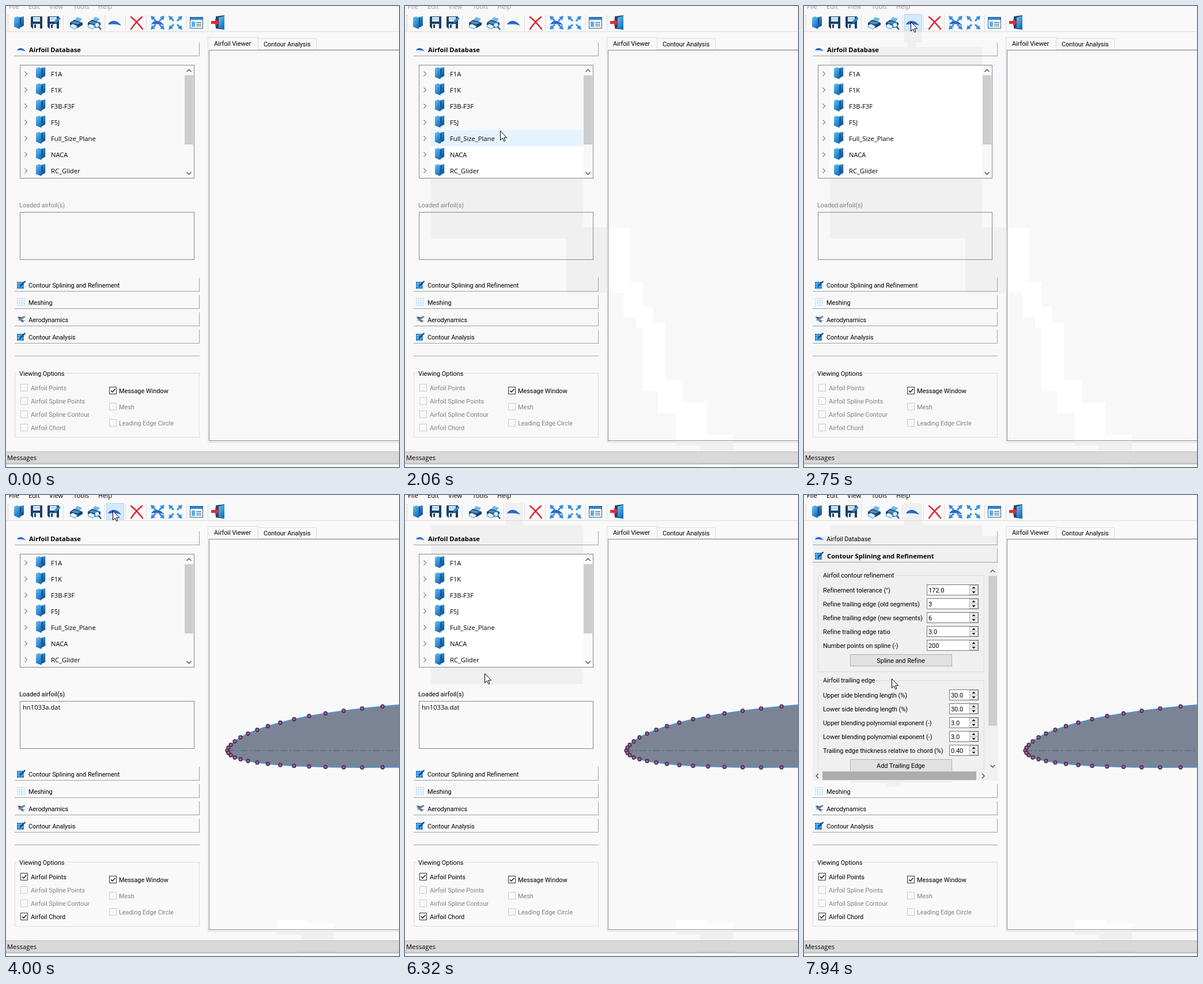
An HTML page for the animation above (8 s loop, 682 by 799 pixels).

```html
<!DOCTYPE html>
<html lang="en">
<head>
<meta charset="utf-8">
<title>Airfoil workbench</title>
<style>
html, body { margin: 0; width: 100%; height: 100%; overflow: hidden; background: #f8f8f8; }
svg { display: block; width: 682px; height: 799px; }
text { font: 11px Roboto, "Liberation Sans", sans-serif; letter-spacing: -.08px; fill: #000; white-space: pre; }
.ui { font: 11.2px "Open Sans", "Noto Sans", sans-serif; letter-spacing: 0; }
.bold { font: bold 11.2px "Open Sans", "Noto Sans", sans-serif; letter-spacing: 0; }
.mid { text-anchor: middle; }
.dim { fill: #838383; }
.faint { fill: #999; }
.line { fill: none; stroke: #a0a0a0; shape-rendering: crispEdges; }
.soft { stroke: #dcdcdc; }
.frame { stroke: #828790; }
.dots { stroke: #b4b4b4; stroke-dasharray: 2 2; }
.box { shape-rendering: crispEdges; }
.chev { fill: none; stroke: #505050; stroke-width: 1.4; }
.tick { fill: none; stroke: #111; stroke-width: 1.3; }
.hide { display: none; }
</style>
</head>
<body>
<svg id="stage" viewBox="0 0 682 799" xmlns="http://www.w3.org/2000/svg"></svg>
<script>
const LOOP = 8000, MENU_ON = 3830, LOADED = 4000, PAGE = 7400;

// ---------- drawing helpers ----------
const text = (x, y, s, cls = '') => `<text x="${x}" y="${y}" class="${cls}">${s}</text>`;
const rect = (x, y, w, h, fill, stroke) => stroke
  ? `<rect class="box" x="${x + .5}" y="${y + .5}" width="${w - 1}" height="${h - 1}" fill="${fill}" stroke="${stroke}"/>`
  : `<rect class="box" x="${x}" y="${y}" width="${w}" height="${h}" fill="${fill}"/>`;
const path = (d, fill, more = '') => `<path d="${d}" fill="${fill}" ${more}/>`;
const line = (d, cls = '') => `<path d="${d}" class="line ${cls}"/>`;
const use = (id, x, y, s = 1) => `<use href="#${id}" transform="translate(${x} ${y}) scale(${s})"/>`;
const group = (cls, s) => `<g class="${cls}">${s}</g>`;
const chevron = (x, y, turn) =>
  `<path class="chev" d="M-4 2L0-2 4 2" transform="translate(${x} ${y}) rotate(${turn})"/>`;

const defs = `<defs>
<linearGradient id="sky" x2="0.6" y2="1"><stop stop-color="#69c3f2"/><stop offset="1" stop-color="#1670bd"/></linearGradient>
<linearGradient id="sea" x2="0.3" y2="1"><stop stop-color="#3b9be0"/><stop offset="1" stop-color="#134f94"/></linearGradient>
<clipPath id="view"><rect x="353" y="77" width="329" height="676"/></clipPath>
<clipPath id="scroll"><rect x="15" y="118" width="304" height="360"/></clipPath>
<pattern id="fresh" width="682" height="799" patternUnits="userSpaceOnUse">
  <rect width="682" height="799" fill="#f0f0f0"/>
  <path d="M351 76H682V756H351ZM25 103H326V298H25ZM0 794H682V799H0Z" fill="#fff"/>
  <path class="loaded" d="M25 358H326V439H25Z" fill="#fff"/>
</pattern>
<g id="folder">${path('M7 3L18 1V17L9 22Z', 'url(#sea)') + path('M1 3L7 1 11 5V23L1 19Z', 'url(#sky)') + path('M11 5L13 3V13L11 16Z', '#0f4a86')}</g>
<g id="disk">${path('M1 0H20V21H3L0 18V1Z', '#1c3f66') + rect(4, 1, 12, 8, '#d9ecfa') + rect(5, 4, 10, 1, '#7fb1dc') + rect(4, 13, 12, 8, '#eef5fb') + rect(6, 14, 3, 6, '#1c3f66')}</g>
<g id="pen">${path('M0 13L2 8 11 0 14 3 5 11Z', '#2f86cf') + path('M0 13L2 8 5 11Z', '#173a60')}</g>
<g id="printer">${path('M8 8L13 1 22 4 17 11Z', '#6bb8ee') + path('M1 11L8 6 23 11V15L14 20 1 15Z', '#1f4166') + path('M3 11L8 8 20 11 14 14Z', '#4a90cc') + path('M2 15L6 13 14 17 10 22 1 18Z', '#e6f3fc', 'stroke="#3d93d6"')}</g>
<g id="wing">${path('M0 7C4-1 15-2 23 9C16 6 8 6 0 7Z', '#2a66cf')}</g>
<g id="arrow">${path('M0 0L8 2 6 4 10 8 8 10 4 6 2 8Z', '#2e8fe0')}</g>
<g id="arrows">${[0, 90, 180, 270].map(a => `<use href="#arrow" transform="rotate(${a} 12 12)"/>`).join('')}</g>
<g id="mesh">${rect(0, 0, 15, 15, '#eff8fe') + path('M.5 0V15M4.5 0V15M8.5 0V15M12.5 0V15M0 .5H15M0 4.5H15M0 8.5H15M0 12.5H15', 'none', 'stroke="#b7dcf3" stroke-dasharray="2 1"')}</g>
<g id="spline">${rect(0, 2, 12, 12, '#2484d0') + path('M3.5 2V14M7.5 2V14M0 5.5H12M0 9.5H12', 'none', 'stroke="#7cc0ee"') + path('M4 12L6 7 14 0 15 2 8 9Z', '#1b4a7c')}</g>
<g id="plane">${path('M0 4L4 5 13 1 15 3 9 7 12 13 9 12 5 9 1 9 4 7Z', '#76879a') + path('M1 2L9 4 4 6ZM7 9L15 9 9 11Z', '#35506e')}</g>
</defs>`;

// ---------- toolbar and right side ----------
const menu = cls => [['File', 5], ['Edit', 39], ['View', 75], ['Tools', 117], ['Help', 160]]
  .map(([s, x]) => text(x, 5, s, 'ui ' + cls)).join('');

const toolbar = line('M3.5 16V43', 'dots') + line('M0 44.5H682', 'soft')
  + [99, 171, 207, 243, 313, 350].map(x => line(`M${x}.5 16V42`, 'soft')).join('')
  + use('folder', 13, 17) + use('disk', 43, 18) + use('disk', 72, 18) + use('pen', 81, 19)
  + use('printer', 110, 18) + use('printer', 141, 18)
  + '<circle cx="158" cy="33" r="4.2" fill="#d5edfb" stroke="#2f79b8" stroke-width="1.5"/>' + path('M161 36L165 41', 'none', 'stroke="#1f4e7c" stroke-width="2.2"')
  + use('wing', 177, 25)
  + path('M217 19Q227 27 237 40M236 19Q225 28 217 40', 'none', 'stroke="#e0222c" stroke-width="2.4" stroke-linecap="round"')
  + use('arrows', 251, 17) + use('wing', 252, 25, .98) + use('arrows', 282, 17)
  + rect(319, 19, 23, 20, '#f4fafe', '#2b5f92') + rect(320, 20, 21, 4, '#2f86cf') + rect(322, 27, 6, 9, '#58aee6')
  + path('M330 28.5H339M330 31.5H339M330 34.5H339', 'none', 'stroke="#33475c"')
  + path('M364 18L379 16V41L364 39Z', '#24486c') + path('M369 20L379 17V41L369 38Z', 'url(#sky)')
  + path('M356 26H363V22L370 28.5 363 35V31H356Z', '#d92b3a');

const tabs = line('M350.5 756V54.5H437.5V75M437.5 56.5H538.5V75.5M437 75.5H682M350 756.5H682', 'soft')
  + line('M683 76.5H352.5V753.5H683', 'frame')
  + text(361, 69, 'Airfoil Viewer') + text(447, 70, 'Contour Analysis');

const messages = rect(-1, 772, 684, 20, '#d9d9d9', '#bdbdbd') + line('M0 793.5H682', 'frame') + text(2, 787, 'Messages', 'ui');

function airfoil() {
  const xs = [384, 386, 390, 397, 407, 420, 436, 454.5, 476, 500, 526, 554.5, 586, 618, 653.5, 692];
  const up = [443, 438, 433, 427, 420, 413.5, 407, 400.5, 394.5, 388.5, 383, 378.5, 374, 370, 366.3, 363];
  const low = [443, 447, 451, 455, 458, 461, 463.7, 466, 468, 469.4, 470.5, 471.3, 472, 472.2, 472, 471.7];
  const top = xs.map((x, i) => [x, up[i]]), bottom = xs.map((x, i) => [x, low[i]]);
  const all = [...top.reverse(), ...bottom.slice(1)];
  return `<g clip-path="url(#view)">${path('M' + all.join('L'), '#7b8494', 'stroke="#4595e2" stroke-width="1.7"')}
    ${path('M384 443H682', 'none', 'stroke="#555c69" stroke-dasharray="12 4 3 4"')}
    ${all.map(([x, y]) => `<circle cx="${x}" cy="${y}" r="3" fill="#a8588f" stroke="#3d2946" stroke-width="1.3"/>`).join('')}</g>`;
}

// ---------- left side ----------
const drawer = (y, icon, s, cls = '') => line(`M15 ${y + 23.5}H335.5V${y}`)
  + (icon === 'wing' ? use('wing', 19, y + 9.5, .65) : use(icon, 19, y + 5))
  + text(cls ? 40 : 39, y + 17, s, cls);

const folders = ['F1A', 'F1K', 'F3B-F3F', 'F5J', 'Full_Size_Plane', 'NACA', 'RC_Glider'];
const database = drawer(63, 'wing', 'Airfoil Database', 'bold')
  + line('M24.5 102.5H326.5V298.5H24.5Z', 'frame')
  + folders.map((s, i) => `<path class="chev" style="stroke:#8a8a8a" d="M32.5 ${113.5 + 28 * i}l4 4-4 4"/>`
    + use('folder', 51, 105 + 28 * i, .96) + text(78, 122 + 28 * i, s, 'ui')).join('')
  + rect(310, 120, 15, 120, '#cdcdcd') + chevron(317.5, 112, 0) + chevron(317.5, 290, 180)
  + group('empty', text(23, 349, 'Loaded airfoil(s)', 'dim'))
  + group('loaded', text(23, 349, 'Loaded airfoil(s)') + text(29, 372, 'hn1033a.dat', 'ui'))
  + line('M24.5 357.5H326.5V439.5H24.5Z', 'frame')
  + drawer(471, 'spline', 'Contour Splining and Refinement');

function spin(x, cy, value) {
  const y = cy - 10, b = 287;
  return rect(x, y, 303 - x, 19, '#fff', '#7a7a7a')
    + rect(b, y + 1, 15, 9, '#f0f0f0', '#b5b5b5') + rect(b, y + 9, 15, 9, '#f0f0f0', '#b5b5b5')
    + path(`M${b + 4.5} ${y + 7}h6l-3-3.5ZM${b + 4.5} ${y + 12}h6l-3 3.5Z`, '#111')
    + text(x + 3, cy + 4, value);
}
const field = (x, y) => ([label, value], i) => text(33, y + 4 + 24 * i, label) + spin(x, y + 24 * i, value);
const button = (y, s, fill = '#e1e1e1', edge = '#adadad') => rect(80, y, 177, 21, fill, edge) + text(168, y + 15, s, 'mid');

const refine = rect(15, 71, 321, 424, '#f0f0f0')
  + drawer(63, 'wing', 'Airfoil Database')
  + drawer(93, 'spline', 'Contour Splining and Refinement', 'bold')
  + `<g clip-path="url(#scroll)">`
  + line('M30 139.5H24.5V306.5H312.5V139.5H158', 'soft') + text(33, 143, 'Airfoil contour refinement')
  + [['Refinement tolerance (°)', '172.0'], ['Refine trailing edge (old segments)', '3'],
     ['Refine trailing edge (new segments)', '6'], ['Refine trailing edge ratio', '3.0'],
     ['Number points on spline (-)', '200']].map(field(213, 165)).join('')
  + button(276, 'Spline and Refine')
  + line('M30 321.5H24.5V500H312.5V321.5H125', 'soft') + text(33, 325, 'Airfoil trailing edge')
  + [['Upper side blending length (%)', '30.0'], ['Lower side blending length (%)', '30.0'],
     ['Upper blending polynomial exponent (-)', '3.0'], ['Lower blending polynomial exponent (-)', '3.0'],
     ['Trailing edge thickness relative to chord (%)', '0.40']].map(field(252, 347)).join('')
  + button(458, 'Add Trailing Edge') + group('hot', button(458, 'Add Trailing Edge', '#e5f1fb', '#0078d7')) + '</g>'
  + rect(320, 140, 15, 260, '#cdcdcd') + chevron(327.5, 132, 0) + chevron(327.5, 470, 180)
  + rect(32, 479, 267, 15, '#adadad') + chevron(23, 487, 270) + chevron(311, 487, 90);

function check(x, cy, s, on) {
  return rect(x, cy - 7, 13, 13, on ? '#fff' : 'none', on ? '#333' : '#ccc')
    + (on ? `<path class="tick" d="M${x + 3} ${cy - .5}l2.5 2.8 5-5.6"/>` : '')
    + text(x + (x < 100 ? 18 : 17), cy + 4, s, on ? '' : 'dim');
}
const options = line('M15 606.5H336')
  + line('M20 636.5H15.5V747.5H335.5V636.5H103', 'soft') + text(23, 641, 'Viewing Options')
  + group('empty', check(25, 662, 'Airfoil Points') + check(25, 731, 'Airfoil Chord'))
  + group('loaded', check(25, 662, 'Airfoil Points', 1) + check(25, 731, 'Airfoil Chord', 1))
  + check(25, 685, 'Airfoil Spline Points') + check(25, 708, 'Airfoil Spline Contour')
  + check(179, 667, 'Message Window', 1) + check(179, 695, 'Mesh') + check(179, 723, 'Leading Edge Circle');

const stage = document.getElementById('stage');
stage.innerHTML = defs + '<rect id="base" width="682" height="799"/><path id="trail" fill="url(#fresh)"/>'
  + '<rect id="glow" class="box"/>'
  + group('idle', menu('faint')) + group('ready', menu('')) + toolbar + tabs + group('loaded', airfoil())
  + group('first', database) + group('second', refine)
  + drawer(501, 'mesh', 'Meshing') + drawer(531, 'plane', 'Aerodynamics') + drawer(561, 'spline', 'Contour Analysis')
  + options + messages
  + '<path id="cursor" d="M.5.5V16.5L4.3 13 6.8 18.6 9 17.6 6.6 12.2H11.6Z" fill="#fff" stroke="#000"/>';

// ---------- motion: time, pointer x, pointer y, hovered part ----------
const TOOL = 'tool', ADD = 'add';
const moves = [
  [1210, 557, 780], [1290, 512, 743], [1360, 470, 687], [1440, 439, 648], [1520, 412, 549], [1590, 419, 539],
  [1820, 401, 521], [1900, 379, 478], [1980, 280, 384], [2060, 165, 216, 4], [2130, 161, 175, 2], [2210, 163, 150, 1],
  [2290, 168, 130, 0], [2360, 174, 106, 0], [2440, 180, 71], [2520, 182, 53], [2590, 182, 44],
  [2670, 184, 33, TOOL], [2750, 185, 27, TOOL],
  [5940, 181, 37, TOOL], [6020, 176, 52], [6090, 166, 110, 0], [6170, 154, 177, 2], [6250, 144, 245, 5], [6320, 138, 309],
  [6400, 138, 365], [6480, 140, 417], [6560, 144, 460], [6630, 148, 486], [6710, 155, 484], [6790, 156, 483],
  [7780, 156, 480], [7860, 154, 459, ADD], [7940, 152, 318]
];

// Boxes are [left, top, right, bottom].
const part = h => h === TOOL ? [174, 14, 205, 43] : h === ADD ? [80, 458, 257, 479]
  : h >= 0 ? [45, 103 + 28 * h, 309, Math.min(298, 131 + 28 * h)] : null;
const union = list => [0, 1, 2, 3].map(i => Math[i < 2 ? 'min' : 'max'](...list.map(b => b[i])));
const pointer = m => [m[1], m[2], m[1] + 12, m[2] + 19];

// Each move repaints one box around the old and new pointer and any changed hover.
const repaints = moves.map((m, i) => {
  const last = moves[i - 1], list = [pointer(m)];
  if (last) list.push(pointer(last));
  if (last && last[3] !== m[3]) list.push(...[part(last[3]), part(m[3])].filter(Boolean));
  return { at: m[0], box: union(list) };
});
repaints.push({ at: 7170, box: [15, 471, 336, 495] });

function trail(t) {
  let d = '';
  for (const { at, box: [l, top, r, b] } of repaints) {
    if (at > t) continue;
    const y = t >= LOADED && at < LOADED ? Math.max(top, 737) : top;
    if (y < b) d += `M${l} ${y}H${r}V${b}H${l}Z`;
  }
  return d;
}

const $ = id => document.getElementById(id);
const show = (cls, on) => stage.querySelectorAll('.' + cls).forEach(e => e.classList.toggle('hide', !on));
const place = (el, o) => Object.entries(o).forEach(([k, v]) => el.setAttribute(k, v));
const times = [0, MENU_ON, LOADED, PAGE, ...repaints.map(r => r.at)];
let shown = -1;

function render(t) {
  const m = moves.filter(s => s[0] <= t).pop(), hover = m && m[3], box = part(hover);
  $('base').setAttribute('fill', t < LOADED ? '#f8f8f8' : '#f9f9f9');
  $('trail').setAttribute('d', trail(t));
  show('idle', t < MENU_ON); show('ready', t >= MENU_ON);
  show('empty', t < LOADED); show('loaded', t >= LOADED);
  show('first', t < PAGE); show('second', t >= PAGE);
  show('hot', hover === ADD);
  $('cursor').classList.toggle('hide', !m);
  if (m) $('cursor').setAttribute('transform', `translate(${m[1]} ${m[2]})`);
  const tool = hover === TOOL, lit = box && hover !== ADD;
  $('glow').classList.toggle('hide', !lit);
  if (lit) place($('glow'), {
    x: box[0] + (tool ? .5 : 0), y: box[1] + (tool ? .5 : 0),
    width: box[2] - box[0] - tool, height: box[3] - box[1] - tool,
    fill: tool ? '#d5e9f9' : '#e5f3ff', stroke: tool ? '#b0d6f3' : 'none'
  });
}

function tick() {
  const t = performance.now() % LOOP, step = Math.max(...times.filter(s => s <= t));
  if (step !== shown) render(shown = step);
  requestAnimationFrame(tick);
}
tick();
</script>
</body>
</html>
```
